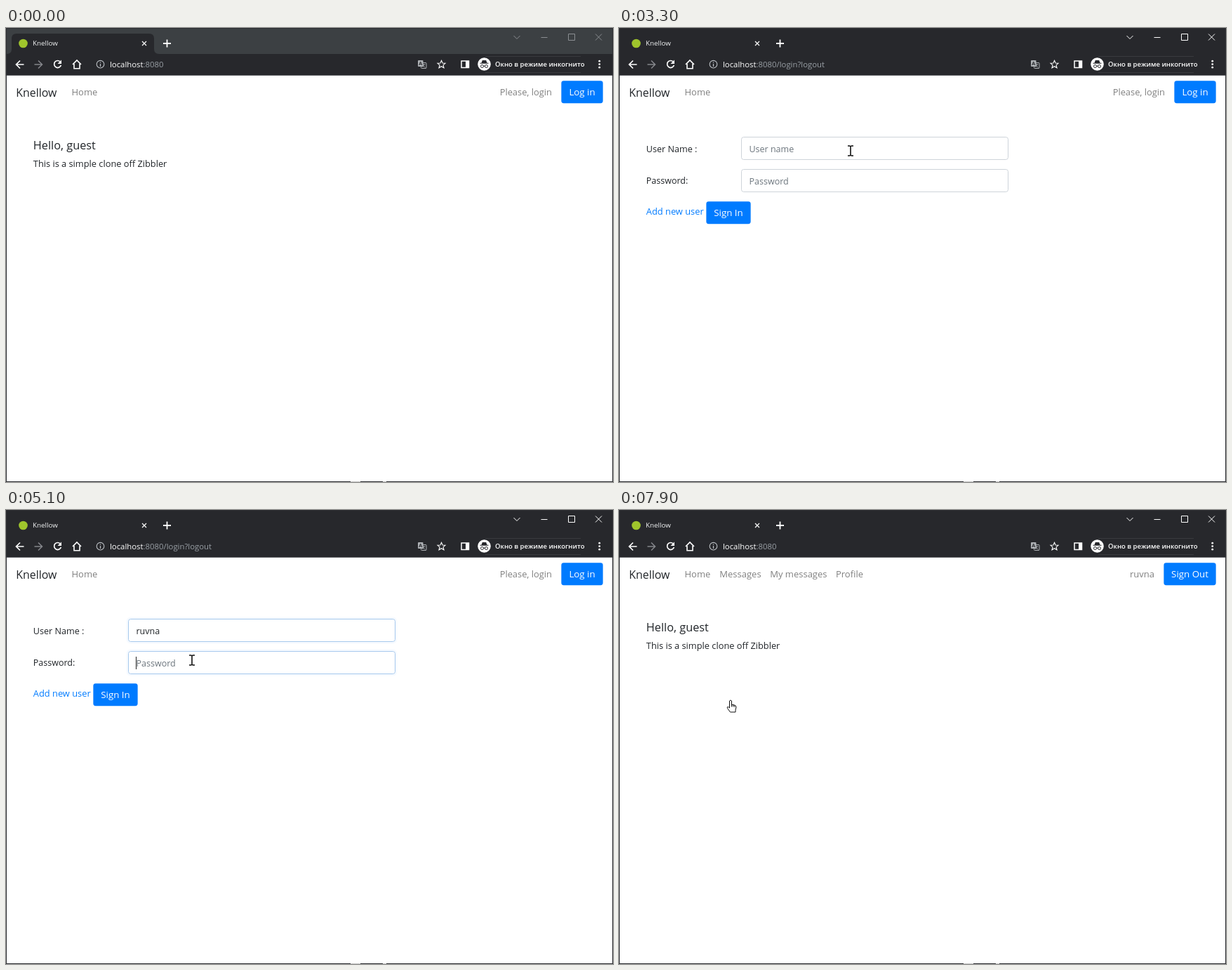
Animation, 865 px wide and 647 px high, one loop 8000 ms. Source, as an HTML page:

```html
<!DOCTYPE html>
<html lang="en">
<head>
<meta charset="utf-8">
<title>Knellow</title>
<style>
html, body { margin: 0; width: 100%; height: 100%; overflow: hidden; background: #fff; }
svg { display: block; width: 865px; height: 647px; }
text { font-family: "Open Sans", "Noto Sans", sans-serif; white-space: pre; }
.line { fill: none; stroke: #fff; }
</style>
</head>
<body>
<svg id="stage" viewBox="0 0 865 647" xmlns="http://www.w3.org/2000/svg"></svg>
<script>
const LOOP = 8000, STEP = 100;
const BLUE = '#007bff', HOVER = '#0069d9', PRESSED = '#0062cc', INK = '#212529', MUTED = '#808080';
const BAR = '#27282c';
const USER = 'ruvna';
const ACCOUNTS = ['u', 'Tamelimon', 'u1', 'dumel', USER, 'dorvelan@ex.test'];

// Markup helpers
const text = (x, y, size, fill, str, more = '') =>
  `<text x="${x}" y="${y}" font-size="${size}" fill="${fill}" ${more}>${str}</text>`;
const rect = (x, y, w, h, fill, more = '') =>
  `<rect x="${x}" y="${y}" width="${w}" height="${h}" fill="${fill}" ${more}/>`;
const line = (d, more = '') => `<path class="line" d="${d}" ${more}/>`;
const group = (id, body) => `<g id="${id}">${body}</g>`;
const button = (id, x, y, w, label) =>
  rect(x - 1.3, y - 1.3, w + 2.6, 34.6, 'none', `id="${id}Ring" rx="4.5" stroke="#80bdff" stroke-width="2.6" opacity="0"`) +
  rect(x + 0.35, y + 0.35, w - 0.7, 31.8, BLUE, `id="${id}" rx="3.4"`) +
  text(x + w / 2, y + 21, 13.3, '#fff', label, 'text-anchor="middle"');
const field = (id, y) =>
  rect(172.9, y - 1.8, 383, 35.6, 'none', `id="${id}Ring" rx="4.6" stroke="#bfdeff" stroke-width="2.6"`) +
  rect(174.5, y, 380, 32, '#fff', `id="${id}Box" rx="3.2" stroke="#ced4da"`) +
  text(185.5, y + 21.5, 12.5, '#6c757d', '', `id="${id}Text"`);

const tabs =
  rect(0, 0, 865, 67, BAR) + rect(0, 67, 865, 1, '#6a6b6f') +
  group('idleStrip', rect(0, 0, 865, 37, '#3c4043') +
    `<path d="M1 37Q8 37 8 30V15Q8 8 15 8H204Q211 8 211 15V30Q211 37 218 37Z" fill="${BAR}"/>`) +
  '<circle cx="24.5" cy="22" r="6.3" fill="#9fc52c"/>' +
  text(38, 25, 9.8, '#f1f3f4', 'Knellow') +
  line('M194 19L200 25M200 19L194 25', 'stroke-width="1.2"') +
  line('M224 22H235M229.5 16.5V27.5', 'stroke-width="1.8"') +
  line('M723.5 11L728 15.5 732.5 11M762.5 13.5H771.5M801.5 8.5H810.5V17.5H801.5ZM840 8.5L849 17.5M849 8.5L840 17.5', 'id="controls"');

const toolbar =
  line('M25.5 52H15M20 46.5L14.5 52 20 57.5', 'stroke-width="1.7"') +
  line('M40.5 52H51M46 46.5L51.5 52 46 57.5', 'stroke-width="1.5" style="stroke:#85878b"') +
  line('M77.2 48A5 5 0 1 0 78.4 53', 'stroke-width="1.7"') +
  '<path d="M79 45.5V51H73.5Z" fill="#fff"/>' +
  line('M95 52L101 46 107 52M97 51V57.7H105V51', 'stroke-width="1.6"') +
  line('M134.5 51V55M134.5 48.5V49.8', 'stroke-width="1.2" style="stroke:#bdc1c6"') +
  '<circle cx="134.5" cy="51.7" r="5.3" fill="none" stroke="#bdc1c6" stroke-width="1.1"/>' +
  text(148, 56, 11.35, '#fff', 'localhost<tspan id="path" fill="#9aa0a6">:8080</tspan>') +
  rect(591.5, 49.5, 7.5, 8, 'none', 'stroke="#aeb1b5" rx="1"') +
  rect(587, 46, 7.5, 9, '#aeb1b5', 'rx="1"') +
  text(588.2, 53.3, 7, BAR, 'A', 'font-weight="700"') +
  line('M593.5 52H597.5M595.5 51V52Q595 55 593.5 56M594 53L597.5 56.5', 'stroke-width=".8" style="stroke:#aeb1b5"') +
  line('M620.5 46.3L622.1 50 626 50.3 623 52.9 624 56.8 620.5 54.7 617 56.8 618 52.9 615 50.3 618.9 50Z', 'stroke-width="1.1"') +
  line('M649 47H659.5V56.5H649Z', 'stroke-width="1.5"') + rect(655, 47, 5, 10, '#fff') +
  line('M683 40.5H819M683 63.5H819', 'style="stroke:#393a3e"') +
  '<circle cx="681.5" cy="51.5" r="9.3" fill="#fff"/>' +
  `<path d="M675.5 50.8H687.5V49.8H685.5L684.2 46H678.8L677.5 49.8H675.5Z" fill="${BAR}"/>` +
  `<path d="M680.5 54.2H682.5M680.5 54.5A2 2 0 1 1 676.5 54.5A2 2 0 1 1 680.5 54.5M686.5 54.5A2 2 0 1 1 682.5 54.5A2 2 0 1 1 686.5 54.5" fill="none" stroke="${BAR}"/>` +
  text(697, 55, 9.5, '#fff', 'Окно в режиме инкогнито', 'font-weight="600"') +
  [47.2, 51.7, 56.2].map(y => `<circle cx="845.7" cy="${y}" r="1.4" fill="#fff"/>`).join('');

const nav =
  text(14.3, 98, 15.9, INK, 'Knellow') +
  text(93.5, 96, 13, MUTED, 'Home') +
  group('guestNav', text(778, 96, 12.85, MUTED, 'Please, login', 'text-anchor="end"') +
    button('login', 791, 75, 60, 'Log in')) +
  group('userNav', text(143.3, 96, 13, MUTED, 'Messages') + text(215.2, 96, 13, MUTED, 'My messages') +
    text(309, 96, 13, MUTED, 'Profile') + text(763, 96, 13, MUTED, USER, 'text-anchor="end"') +
    button('logout', 776, 75, 75, 'Sign Out'));

const home = group('home',
  text(38.8, 173, 16.3, INK, 'Hello, guest', 'font-weight="500"') +
  text(38.8, 198, 12.8, INK, 'This is a simple clone off Zibbler'));

const form = group('form',
  text(38.8, 177, 12.6, INK, 'User Name :') + text(38.8, 222, 12.5, INK, 'Password:') +
  field('user', 155.5) + field('pass', 201.5) +
  '<circle id="dot" cx="188" cy="218" r="2" fill="#495057"/>' +
  rect(185, 209, 1, 18, '#222', 'id="caret"') +
  text(38.8, 266, 12.85, BLUE, 'Add new user') +
  button('signIn', 124, 247, 64, 'Sign In'));

const menu = group('menu',
  rect(257, 194, 114, 193, '#000', 'rx="4" opacity=".15"') +
  `<path d="M269 195.5L276.5 188.5 284 195.5Z" fill="${BAR}"/>` +
  rect(258, 195, 112, 190, BAR, 'rx="3"') +
  rect(258, 0, 112, 30.4, '#3f4042', 'id="pick"') +
  ACCOUNTS.map((name, i) => text(268, Math.round(218 + i * 30.4), 10.4, '#fff', name, 'font-weight="500"')).join(''));

const outline = 'fill="#fff" stroke="#111" stroke-linejoin="round"';
const cursors = group('cursor',
  group('arrow', `<path d="M.5 .5V12.3L3.2 9.8 5 14 7 13.1 5.2 9.1H9Z" ${outline}/>`) +
  group('beam', ['stroke="#fff" stroke-width="3"', 'stroke="#111" stroke-width="1.6"'].map(s =>
    `<path d="M-4-7H-1.2L0-6 1.2-7H4M0-6V6M-4 7H-1.2L0 6 1.2 7H4" fill="none" ${s}/>`).join('')) +
  group('hand', `<path d="M-1.5 1Q0-1 1.5 1V6L6 7.2Q8 8 8 10L7 14V17H-.5L-4.5 11.5Q-5.5 9.3-3.5 9.5L-1.5 11Z" ${outline}/>` +
    '<path d="M1.5 6V9.5M3.7 6.8V9.5M5.8 7.3V9.8" stroke="#111" fill="none"/>'));

const frame = rect(.5, .5, 864, 646, 'none', 'stroke="#2b2c30"') +
  rect(491, 646, 14, 1, '#c8c8c8') + rect(537, 646, 5, 1, '#c8c8c8');

document.getElementById('stage').innerHTML =
  rect(0, 0, 865, 647, '#fff') + tabs + toolbar + nav + home + form + menu + frame + cursors;

const el = {};
document.querySelectorAll('[id]').forEach(node => { el[node.id] = node; });
const show = (id, on) => el[id].setAttribute('visibility', on ? 'inherit' : 'hidden');
const set = (id, name, value) => el[id].setAttribute(name, value);

// Pointer: time, x, y, shape
const A = 'arrow', I = 'beam', H = 'hand';
const PATH = [
  [500, 3, 2, A], [1300, 90, 116, A], [1400, 163, 195, I], [1500, 163, 195, I],
  [1600, 330, 216, A], [1800, 690, 165, A], [1900, 785, 125, A], [2000, 840, 98, H],
  [2600, 840, 98, H], [2700, 831, 105, H], [2800, 808, 118, A], [2900, 808, 118, A],
  [3000, 720, 140, A], [3100, 540, 170, I], [3200, 390, 180, I], [3300, 330, 175, I],
  [3700, 330, 175, I], [3800, 331, 212, A], [4000, 332, 292, A], [4100, 331, 323, A],
  [4200, 331, 323, A], [4300, 332, 336, A], [4600, 332, 336, A], [4700, 322, 312, A],
  [4800, 298, 262, A], [4900, 275, 226, I], [5000, 265, 214, I], [6100, 265, 214, I],
  [6200, 240, 224, I], [6300, 190, 264, A], [6400, 158, 287, A], [6500, 158, 284, A],
  [6600, 159, 276, H], [6700, 159, 271, H], [LOOP, 159, 271, H]
];
const PICKS = [[3800, 0], [3900, 1], [4000, 2], [4100, 3], [4300, 4], [4500, -1]];

const within = (t, from, to) => t >= from && t < to;
const last = (table, t) => table.filter(row => row[0] <= t).pop();

function pointer(t) {
  const a = last(PATH, t);
  if (!a) return null;
  const b = PATH[PATH.indexOf(a) + 1] || a;
  const k = b === a ? 0 : (t - a[0]) / (b[0] - a[0]);
  return { x: a[1] + (b[1] - a[1]) * k, y: a[2] + (b[2] - a[2]) * k, shape: a[3] };
}

// Focus level with a half-way step at each end
const focus = (t, from, to) =>
  within(t, from + STEP, to) ? 1 : t === from || t === to ? 0.5 : 0;

function glow(id, k) {
  const mix = (a, b) => Math.round(a + (b - a) * k);
  set(id + 'Box', 'stroke', `rgb(${mix(206, 128)},${mix(212, 189)},${mix(218, 255)})`);
  set(id + 'Ring', 'opacity', k === 1 ? 1 : k * 0.3);
}

function write(id, str, fill, size = 12.5, weight = 400) {
  el[id].textContent = str;
  set(id, 'fill', fill);
  set(id, 'font-size', size);
  set(id, 'font-weight', weight);
}

function draw(t) {
  const active = t >= 2400;
  const onForm = within(t, 2700, 7600);
  const signedIn = t >= 7600;

  show('idleStrip', !active);
  el.controls.style.stroke = active ? '#fff' : '#8b8e92';
  el.path.textContent = onForm ? ':8080/login?logout' : ':8080';
  show('home', !onForm);
  show('form', onForm);
  show('guestNav', !signedIn);
  show('userNav', signedIn);

  set('login', 'fill', within(t, 2000, 2700) ? (t === 2500 ? PRESSED : HOVER) : BLUE);
  set('loginRing', 'opacity', within(t, 2500, 2700) ? 0.8 : 0);
  set('signIn', 'fill', t >= 6600 ? (t === 7300 ? PRESSED : HOVER) : BLUE);
  set('signInRing', 'opacity', t >= 7300 ? 0.8 : 0);

  const pick = (last(PICKS, t) || [0, -1])[1];
  show('menu', within(t, 3500, 4500));
  // A hidden parent must hide the row as well
  show('pick', pick >= 0);
  set('pick', 'y', 199 + pick * 30.4);

  glow('user', focus(t, 3400, 5100));
  glow('pass', focus(t, 5100, 7300));
  if (t >= 4500) write('userText', USER, INK);
  else if (pick >= 0) write('userText', ACCOUNTS[pick], '#111', 10.4, 500);
  else write('userText', 'User name', '#6c757d');
  write('passText', t < 5900 ? 'Password' : '', '#6c757d');

  show('dot', onForm && t >= 5900);
  const inUser = within(t, 3400, 3800);
  show('caret', inUser || within(t, 5100, 5600) || within(t, 5900, 6400) || within(t, 6900, 7300));
  set('caret', 'x', t >= 5900 ? 190 : 185);
  set('caret', 'y', inUser ? 163 : t >= 5900 ? 208 : 209);

  const p = pointer(t);
  show('cursor', p);
  if (p) {
    set('cursor', 'transform', `translate(${Math.round(p.x)} ${Math.round(p.y)})`);
    [A, I, H].forEach(shape => { el[shape].style.display = shape === p.shape ? '' : 'none'; });
  }
}

const start = performance.now();
function tick() {
  const t = (performance.now() - start) % LOOP;
  draw(Math.floor(t / STEP) * STEP);
  requestAnimationFrame(tick);
}
tick();
</script>
</body>
</html>
```
